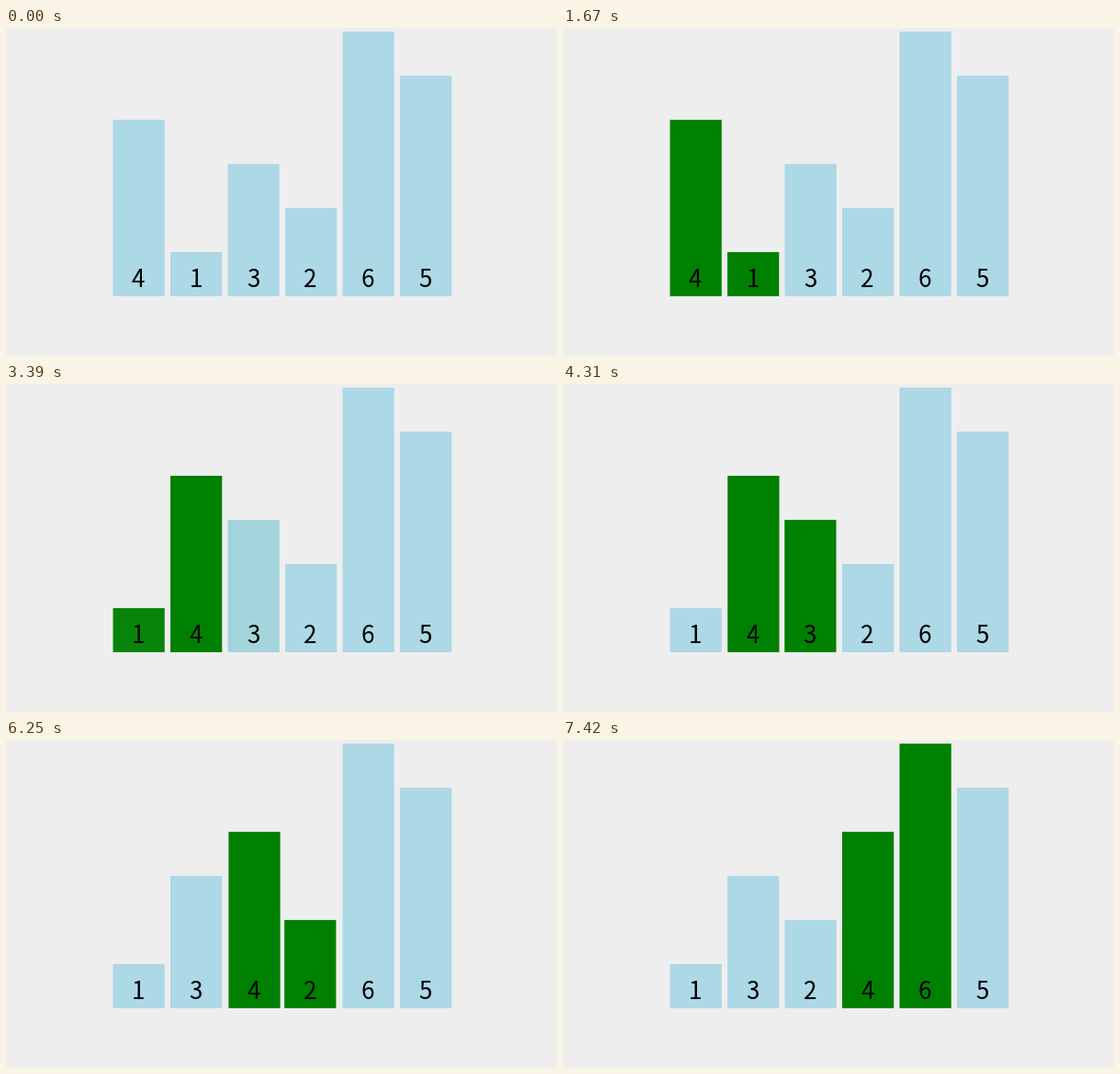
Write a matplotlib script that moves like this. It is 600x357 px and loops after 8 s.

```python
import numpy as np
import matplotlib.pyplot as plt
from matplotlib.animation import FuncAnimation
from matplotlib.colors import to_rgb
from matplotlib.patches import Rectangle

W, H, DPI = 600, 357, 100
LOOP, STEP = 8000, 20
LEFT, PITCH, BAR, FLOOR, UNIT = 116.5, 62.5, 56.25, 291.9, 48
BASELINE, TEXT_PX = 282, 26
VALUES = [4, 1, 3, 2, 6, 5]
IDLE, ACTIVE = np.array(to_rgb("lightblue")), np.array(to_rgb("green"))

# Highlights and swaps alternate at a steady beat, all times in ms.
FIRST, BEAT, DURATION = 1375, 967, 250
# The picture refreshes on a coarser clock of its own.
REFRESH, PHASE = 77.87, 1420


def ease(u):
    """Cubic in-out."""
    u = min(max(u, 0), 1)
    return 4 * u**3 if u < 0.5 else 1 - 4 * (1 - u) ** 3


def refreshed(t):
    return PHASE + (t - PHASE) // REFRESH * REFRESH


def progress(beat, t):
    return ease((t - FIRST - beat * BEAT) / DURATION)


def bar_states(t):
    """Slot and highlight of each bar; the first one bubbles to the right."""
    def highlight(k):
        return progress(2 * k, t)

    def swap(k):
        return progress(2 * k + 1, t)

    others = range(len(VALUES) - 1)
    states = [(sum(swap(k) for k in others), highlight(0))]
    for k in others:
        states.append((k + 1 - swap(k), highlight(k) - highlight(k + 1)))
    return states


fig = plt.figure(figsize=(W / DPI, H / DPI), dpi=DPI, facecolor="#eeeeee")
ax = fig.add_axes([0, 0, 1, 1])
ax.set_xlim(0, W)
ax.set_ylim(H, 0)
ax.axis("off")

bars, labels = [], []
for order, value in enumerate(VALUES):
    rect = Rectangle((0, FLOOR - value * UNIT), BAR, value * UNIT,
                     linewidth=0, zorder=order, snap=False)
    bars.append(ax.add_patch(rect))
    labels.append(ax.text(0, BASELINE, str(value), ha="center", va="baseline",
                          family="Noto Sans CJK JP", color="black",
                          fontsize=TEXT_PX * 72 / DPI, zorder=order + 0.5))


def draw(frame):
    t = refreshed(frame * STEP + STEP / 2)
    for rect, label, (slot, glow) in zip(bars, labels, bar_states(t)):
        x = LEFT + slot * PITCH
        rect.set_x(x)
        rect.set_facecolor(IDLE + (ACTIVE - IDLE) * glow)
        label.set_x(x + BAR / 2 - 0.5)
    return bars + labels


anim = FuncAnimation(fig, draw, frames=LOOP // STEP, interval=STEP,
                     repeat=True, repeat_delay=0, blit=False)
plt.show()
```
